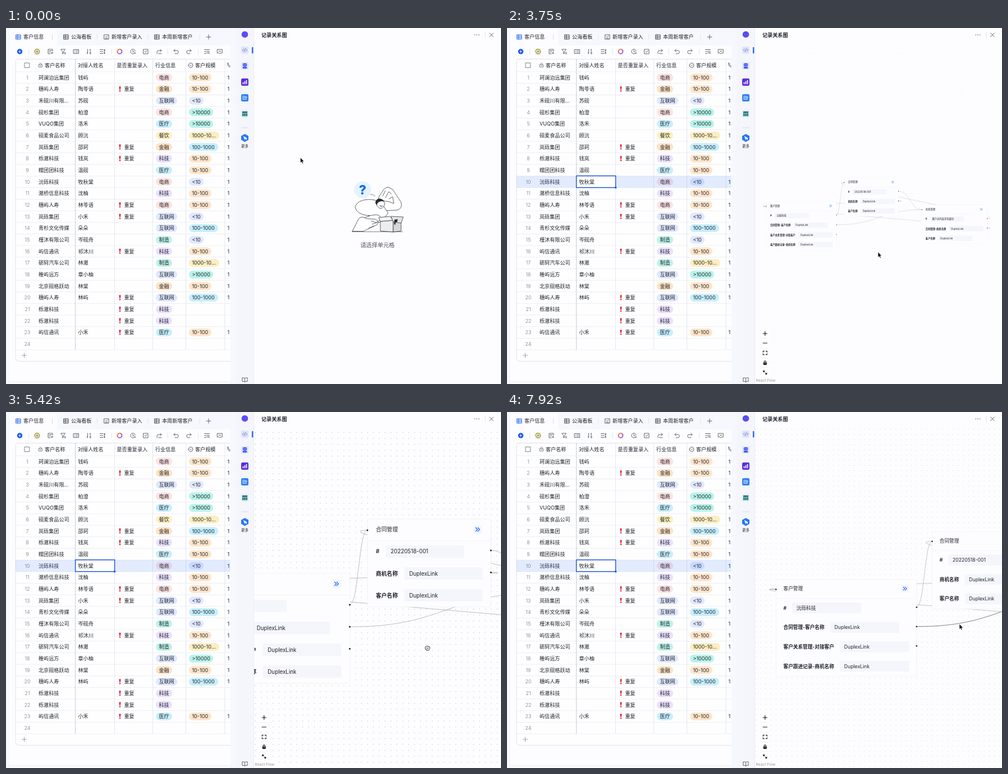
These frames come from a looping animation (882 px wide and 635 px high, 8 s). An HTML page:

```html
<!DOCTYPE html>
<html lang="zh-CN">
<head>
<meta charset="utf-8">
<style>
  html, body { margin: 0; width: 100%; height: 100%; overflow: hidden; background: #fdfdff; }
  svg { display: block; width: 882px; height: 635px; }
  text { font-family: Inter, "Noto Sans CJK SC", "Noto Sans CJK", "Noto Sans", sans-serif; white-space: pre; }
</style>
</head>
<body>
<svg id="stage" viewBox="0 0 882 635"></svg>
<script>
const LOOP = 8000, FPS = 12;
const INK = '#1f2329', BLUE = '#2468f2', GREY = '#50555e';

// ---- drawing helpers: each returns markup ----
const esc = s => s.replace(/</g, '&lt;').replace(/>/g, '&gt;');
const text = (x, y, s, size = 9.1, fill = INK, more = '') =>
  `<text x="${x}" y="${y + size * .37}" font-size="${size}" fill="${fill}" ${more}>${esc(s)}</text>`;
const rect = (x, y, w, h, fill, r = 0, more = '') =>
  `<rect x="${x}" y="${y}" width="${w}" height="${h}" rx="${r}" fill="${fill}" ${more}/>`;
const line = (d, stroke = GREY, w = .9, more = '') =>
  `<path d="${d}" fill="none" stroke="${stroke}" stroke-width="${w}" ${more}/>`;
const dot = (x, y, r, fill, more = '') => `<circle cx="${x}" cy="${y}" r="${r}" fill="${fill}" ${more}/>`;
const icon = (x, y, d, stroke, w, more) =>
  `<g transform="translate(${x} ${y})">${line(d, stroke, w, 'stroke-linecap="round" stroke-linejoin="round"')}${more || ''}</g>`;

// ---- table data ----
const rows = `珂澜泊远集团 钱屿 - 电商 10-100
穗屿人寿 陶苓语 ! 金融 10-100
禾砚川有限... 苏砚 - 互联网 <10
砚杉集团 柏澄 - 电商 >10000
VUQO集团 洛禾 - 医疗 >10000
砚麦食品公司 顾沅 - 餐饮 1000-10...
岚砾集团 邵珂 ! 金融 100-1000
栎澈科技 钱岚 ! 科技 10-100
糯团团科技 温砚 - 医疗 10-100
沅砾科技 牧秋棠 - 电商 <10
澈桥信息科技 沈柚 - 科技 10-100
穗屿人寿 林苓语 ! 电商 10-100
岚砾集团 小禾 ! 互联网 <10
青杉文化传媒 朵朵 - 互联网 100-1000
槿沐有限公司 岑砚舟 - 制造 <10
屿信通讯 祁沐川 ! 科技 10-100
砺轲汽车公司 林澈 - 制造 1000-10...
稚屿远方 章小柚 - 互联网 >10000
北京砚格跃动 林棠 - 金融 10-100
穗屿人寿 林屿 ! 互联网 100-1000
栎澈科技 - ! 科技 -
栎澈科技 - ! 科技 -
屿信通讯 小禾 ! 医疗 10-100`.split('\n').map(r => r.split(' '));

const industry = { 电商: '#fde2e2', 金融: '#fee2c6', 互联网: '#e0e8fe', 医疗: '#c8effc', 餐饮: '#fdf0bf', 科技: '#ebe1fc', 制造: '#c0f2e8' };
const scale = {
  '10-100': [40, '#fee5ca'], '<10': [26, '#e0e8fe'], '>10000': [43, '#b9f3ea'],
  '1000-10...': [54, '#fbeec2'], '100-1000': [52, '#c6effd']
};
const ROW = 20.67, rowY = i => 88.3 + i * ROW;

const gridIcon = (x, c) => icon(x, 16, 'M-4-4H4V4H-4ZM-4-1.3H4M-4 1.3H4M-1.2-4V4', c, 1);

function drawTabs() {
  const tab = (x, s) => text(x, 16, s);
  return rect(0, 0, 442, 635, '#f6f8fd') + rect(6, 31, 394, 604, '#fdfdff') +
    `<path d="M6 32V8Q6 3 11 3H86Q91 3 91 8V32Z" fill="#fdfdff"/>` +
    gridIcon(22, BLUE) + tab(31, '客户信息') + text(78, 16, '⋮', 9, '#8f959e') +
    gridIcon(107, GREY) + tab(116, '公海看板') +
    icon(179, 16, 'M-4-4H4V4H-4ZM-2-.8L-.6 .8 2-2M-2 2.6H2', GREY) + tab(188, '新增客户录入') +
    gridIcon(269, GREY) + tab(278, '本周新增客户') +
    icon(361, 16, 'M-4 0H4M0-4V4', GREY) +
    line('M162.5 11V21M253 11V21M345 11V21', '#dcdfe6', .8);
}

function drawTools() {
  const at = (x, d) => icon(x, 42, d, GREY);
  return dot(24.5, 42, 4.7, '#1456f0') + icon(24.5, 42, 'M-2 0H2M0-2V2', '#fff') +
    rect(49.5, 36, 12, 12, '#fdf6c9', 2) +
    at(55.5, 'M-2.2-4H2.2L4.5 0 2.2 4H-2.2L-4.5 0ZM-1.4 0A1.4 1.4 0 1 0 1.4 0 1.4 1.4 0 1 0-1.4 0') +
    at(79, 'M4-.5V-4H-4V4H0M-2-1.5H2M-2 1H0M1.5 2.5H4.5M3 1V4') +
    at(102, 'M-4-4H3.5L.5 0V3L-1.5 4V0ZM2 2H4.5M2 4H4.5') +
    at(125, 'M-4.5-3.5H4.5V3.5H-4.5ZM-2.5-1.2H-2M0-1.2H2.5M-2.5 1.2H-2M0 1.2H2.5') +
    at(148, 'M-2.5-4V4L-4.2 2M1-3.5L2.3-4V-.8M1 1H3.4L1 4H3.6') +
    at(172, 'M-4.5-3.5H1M-4.5 0H1M-4.5 3.5H1M3.5-3.5V3.5M2.3-2.2L3.5-3.6 4.7-2.2M2.3 2.2L3.5 3.6 4.7 2.2') +
    icon(202.5, 42, 'M-4 0A4 4 0 0 1 2.8-2.8', '#f0863c', 1.8) +
    icon(202.5, 42, 'M2.8-2.8A4 4 0 0 1 0 4', '#8a5cf5', 1.8) + icon(202.5, 42, 'M0 4A4 4 0 0 1-4 0', '#e457b8', 1.8) +
    at(226, 'M4 1.5A4.2 4.2 0 1 1 4.2-1M0-2.3V.3H2.3M2.5 3H4.8') +
    at(249, 'M-4-4H4V4H-4ZM-2-.2L-.4 1.5 2.3-1.6') +
    at(273, 'M-4 3.5V1Q-4-1.8-1-1.8H4M1.8-4L4.2-1.8 1.8 .4M-1.5 3.7H4') +
    at(303, 'M-1.8-4L-4-1.8-1.8 .4M-4-1.8H1.5Q4.2-1.8 4.2 1T1.5 3.8H-2') +
    at(326, 'M1.8-4L4-1.8 1.8 .4M4-1.8H-1.5Q-4.2-1.8-4.2 1T-1.5 3.8H2') +
    at(358, 'M-4.5-3.5H4.5M-4.5 0H-1.5M-4.5 3.5H-1.5M4 1A2 2 0 1 1 0 1 2 2 0 1 1 4 1M3.3 2.5L4.8 4') +
    at(381, 'M-4.3-3.8H4.3V2.6H1.3L0 4 -1.3 2.6H-4.3ZM-1.8-.6H1.8') +
    line('M40.5 37V47M188 37V47M288 37V47M342.5 37V47', '#dcdfe6', .8);
}

function drawTable() {
  const pill = (x, y, w, fill, s) => rect(x, y - 7, w, 14, fill, 7) + text(x + 5.4, y, s);
  let s = `<path d="M400 55.5H22Q17 55.5 17 60V588Q17 594.5 23.5 594.5H400" fill="#fefeff" stroke="#dcdfe8" stroke-width=".9"/>`;
  for (let i = 0; i < 25; i++) s += line(`M17 ${78 + i * ROW}H400`, '#e6e8f0', .7);
  s += line('M193.5 56V574M261.5 56V574M320.5 56V574M390 56V574', '#dfe1ea', .8) + line('M123.5 56V574', '#c3c7d2');
  s += icon(37.5, 66.5, 'M-4.2-4.2H4.2V4.2H-4.2Z', '#6d737d', .9) +
    icon(61.5, 66.5, 'M-3-.8H3V3.2H-3ZM-1.7-.8V-2.2A1.7 1.7 0 0 1 1.7-2.2V-.8M0 .6V1.6', '#646a73', .8) +
    text(69, 66.5, '客户名称') + text(128, 66.5, '对接人姓名') + text(197.5, 66.5, '是否重复录入') +
    text(266, 66.5, '行业信息') + text(337, 66.5, '客户规模') +
    icon(329, 66.5, 'M-4 0A4 4 0 1 0 4 0 4 4 0 1 0-4 0M-1.7-.7L0 1 1.7-.7') +
    icon(397.5, 66.5, 'M-3-3.5Q-3.5 2 3.5 3.7L3 1.5 1 .8Q-1.5-.2-1-1.8L-1.2-3.5Z') +
    icon(32.5, 584, 'M-4 0H4M0-4V4', '#8f959e');
  for (let i = 0; i < 24; i++) s += text(38, rowY(i), `${i + 1}`, 8.8, '#8f959e', 'text-anchor="middle"');
  rows.forEach(([name, person, dup, kind, size], i) => {
    const y = rowY(i);
    s += text(58, y, name) + pill(267, y, 10.8 + kind.length * 9.1, industry[kind], kind);
    if (person != '-') s += text(128.5, y, person);
    if (dup == '!') s += `<path d="M201.4 ${y - 4.3}Q203 ${y - 5.2} 204.6 ${y - 4.3}L203.6 ${y + 1.5}H202.4Z" fill="#dc1a2c"/>` +
      dot(203, y + 3.3, 1.2, '#dc1a2c') + text(210.5, y, '重复');
    if (scale[size]) s += pill(326, y, ...scale[size], size) + text(394.5, y, '1');
  });
  s += `<g id="over">${rect(17, 264, 383, 20.6, '#1f2329', 0, 'opacity=".04"')}</g>`;
  s += `<g id="picked">${rect(17, 264, 106, 20.6, '#3370ff', 0, 'opacity=".13"')}${rect(194, 264, 206, 20.6, '#3370ff', 0, 'opacity=".13"')}` +
    rect(123.6, 263.7, 70, 20.9, 'none', 0, 'stroke="#2456d8" stroke-width="1.5"') + rect(192.2, 283.2, 3, 3, '#2456d8') + '</g>';
  return `<g clip-path="url(#left)">${s}</g>` + line('M6 631H400', '#dfe2ea', .8);
}

function drawSidebar() {
  const x = 425.5;
  return rect(409, 0, 32.5, 635, '#f5f6fb') + line('M441.5 0V635', '#e6e8f0', .7) +
    dot(x, 11.5, 5.8, '#5b4df0') +
    rect(419, 33, 13, 13, '#dfe4fb', 2) + icon(x, 39.5, 'M-2-2L-4.2 0-2 2M2-2L4.2 0 2 2M.7-2.8L-.7 2.8', '#6a75b8', .9) +
    rect(438, 34, 2.4, 11.5, BLUE, 1) +
    rect(419, 61, 13, 13, '#dfe3fc', 2) + rect(421.8, 63, 7.4, 5.5, '#3d54e8', 2) + rect(421.8, 69.3, 7.4, 3, '#3d54e8', 1) +
    dot(424, 65.7, .8, '#fff') + dot(427, 65.7, .8, '#fff') +
    rect(419, 90, 13, 13, '#5a2ee0', 2.5) + icon(x, 96.5, 'M-3 3V1M0 3V-1M3 3V-3', '#fff', 1.7) +
    rect(419, 118, 13, 13, '#2f80f5', 2.5) + icon(x, 124.5, 'M-4-2.5H0M-4 0H-1M-4 2.5H3M3.4-.8A1.4 1.4 0 1 1 .6-.8 1.4 1.4 0 1 1 3.4-.8', '#fff', 1) +
    rect(419, 146.5, 13, 13, '#e0e6f6', 2) + rect(421, 149, 9, 2.4, '#1d5a78') +
    [421, 424.2, 427.4].map(c => rect(c, 152.2, 2.6, 5, '#17876f')).join('') +
    line('M419.5 178H432', '#d3d6df') +
    `<path d="M425.5 189L432 192.6V199.6L425.5 203.2 419 199.6V192.6Z" fill="#2a76f6"/><path d="M423 192.7L429 196.2V199.5L425.5 197.5V201Z" fill="#fff"/>` +
    text(x, 210.7, '更多', 6.5, INK, 'text-anchor="middle"') +
    icon(x, 627.5, 'M0-2.8Q-1-3.6-2.2-3.6H-4.6V3H-1.8L0 4 1.8 3H4.6V-3.6H2.2Q1-3.6 0-2.8V4', GREY);
}

function drawEmpty() {
  const ln = (d, fill = '#fff') => `<path d="${d}" fill="${fill}" stroke="#2b2f36" stroke-width=".75" stroke-linejoin="round"/>`;
  return dot(635.5, 288.5, 15.3, '#e6f3ff') +
    text(635.5, 288.8, '?', 23, '#0f6bf5', 'text-anchor="middle" font-weight="800"') +
    line('M649 297Q654 296 658 300', '#555', .7) +
    ln('M665 300L671 291Q675 284 681 284L689 288 704 311Q707 323 696 325L668 326 660 317Z') +
    ln('M671 300L676 290M676 303L682 292 687 296M682 305L689 301', 'none') +
    ln('M689 301L691 313Q680 308 672 309', 'none') +
    ln('M622 319Q626 307 644 306 658 305 669 312L681 330 668 346 642 351 632 341 648 335Q624 333 622 319Z') +
    ln('M659 311Q661 304 668 306L675 312Q674 321 667 322 660 319 659 311Z') +
    `<path d="M658 312Q660 302 669 305L675 309Q667 308 662 312L661 316Z" fill="#24272c"/>` +
    line('M666 317Q669 319 671 317', '#24272c', 1) +
    ln('M617 362.5L628 341Q633 334 642 340L658 341Q666 345 661 351L648 357 637 362.5Z') +
    ln('M645 335L660 333Q668 334 668 341L660 347 650 344', 'none') + ln('M652 350L661 347M646 357L656 353', 'none') +
    ln('M667 345L690 343V364L667 362Z', '#eceded') + ln('M690 343L704 346V362L690 364Z', '#d5d7da') +
    ln('M667 345L664 338 684 336 690 343Z', '#f4f4f5') + ln('M690 346L686 336 708 337 704 348Z', '#e2e3e5') +
    `<path d="M692 342L698 341 697 346 694 347V351L691.5 350Z" fill="#24272c"/>` + line('M616 363.5H707', '#2b2f36', .6) +
    text(662, 387, '请选择单元格', 10.2, GREY, 'text-anchor="middle"');
}

// ---- graph, in screen units at full zoom ----
const nodes = [
  { x: 435.5, y: 288, w: 284, title: '客户管理', ports: 3, fields: [['#', '沅砾科技'], ['合同管理-客户名称'], ['客户关系管理-对接客户'], ['客户跟进记录-商机名称']] },
  { x: 751, y: 191, w: 220, title: '合同管理', ports: 2, fields: [['#', '20220518-001'], ['商机名称'], ['客户名称']] },
  { x: 1066, y: 302, w: 265, title: '商机管理', ports: 2, fields: [['#', '客户对内容存有疑问'], ['合同管理-商机名称'], ['客户名称']] }
];
const STEP = 39.2, FONT = 9.8;
const inPort = n => [n.x, n.y + 20];
const outPort = (n, i) => [n.x + n.w, n.y + 56 + i * STEP];

function edge([x1, y1], [x2, y2], id = '') {
  const d = x2 - x1, o = d >= 0 ? d / 2 : 6.25 * Math.sqrt(-d * .7);
  return line(`M${x1} ${y1}C${x1 + o} ${y1} ${x2 - o} ${y2} ${x2} ${y2}`, '#b3b2b0', .85, id);
}

function drawNode(n) {
  const tx = n.x + 15, top = n.y + 18.5, h = 39 + n.fields.length * STEP;
  let s = rect(n.x, n.y, n.w, h, '#fdfdff', 2, 'stroke="#eff0f4" stroke-width=".8"') +
    line(`M${n.x} ${n.y + 38.5}h${n.w}`, '#f0f1f5', .8) + text(tx, top, n.title, FONT, INK, 'font-weight="500"') +
    rect(n.x + n.w - 31, top - 7.5, 15, 15, '#f1f6ff', 2) +
    icon(n.x + n.w - 23.5, top, 'M-3.5-3.3L-.3 0-3.5 3.3M.3-3.3L3.5 0 .3 3.3', BLUE, 1.3);
  n.fields.forEach(([label, value = 'DuplexLink'], i) => {
    const y = top + (i + 1) * STEP;
    const cjk = label.replace(/[-#]/g, '').length;
    const bx = tx + 11.6 + (cjk ? cjk * FONT + (label.includes('-') ? 4.5 : 0) : 6);
    const id = n === nodes[1] && i === 2 ? 'id="field"' : '';
    s += text(tx, y, label, FONT, INK, 'font-weight="600"') + rect(bx, y - 11, 139.5, 22, '#f5f6fc', 1.5, id) + text(bx + 8.7, y, value, FONT);
  });
  s += dot(...inPort(n), 1.4, '#111');
  for (let i = 0; i < n.ports; i++) s += dot(...outPort(n, i), 1.4, '#111');
  return s;
}

function drawFlow() {
  const [a, b, c] = nodes;
  const btn = (y, d, more) => icon(459.8, y, d, '#111', 1.1, more);
  return `<g id="flow" clip-path="url(#right)">` + rect(442, 30, 440, 603, 'url(#dots)') + '<g id="world">' +
    edge(outPort(a, 0), inPort(b)) + edge(outPort(b, 0), inPort(c)) + edge(outPort(a, 1), inPort(c), 'id="hot"') +
    edge(outPort(c, 0), inPort(b)) + edge(outPort(b, 1), inPort(a)) + edge(outPort(c, 1), inPort(a)) +
    nodes.map(drawNode).join('') + '</g>' +
    rect(451, 536, 17.5, 87.5, '#fefeff') + line('M451 553.5h17.5M451 571h17.5M451 588.5h17.5M451 606h17.5', '#eeeef2', .8) +
    btn(545, 'M-3.6 0H3.6M0-3.6V3.6') + btn(562, 'M-3.6 0H3.6') +
    btn(579.5, 'M-3.5-1.3V-3.3H-1.3M1.3-3.3H3.5V-1.3M3.5 1.3V3.3H1.3M-1.3 3.3H-3.5V1.3') +
    btn(597.5, 'M-1.6-.5V-2A1.6 1.6 0 0 1 1.6-2V-.5', rect(-2.9, -.8, 5.8, 4.2, '#111', .6) + dot(0, 1.3, .7, '#fff')) +
    btn(614.5, 'M-3-.8V-3H-.8M-3-3L-.8-.8M3 .8V3H.8M3 3L.8 .8') +
    rect(442, 624, 37, 9, '#fdfdff') + text(443.5, 628.8, 'React Flow', 6.7, '#999') + '</g>';
}

const stage = document.getElementById('stage');
stage.innerHTML = `<defs>
  <clipPath id="left"><rect y="50" width="399.7" height="550"/></clipPath>
  <clipPath id="right"><rect x="442" y="30" width="440" height="603"/></clipPath>
  <pattern id="dots" x="435.5" y="288" width="10.5" height="10.5" patternUnits="userSpaceOnUse">${dot(.6, .6, .5, '#9a9ca8')}</pattern>
  <linearGradient id="fade" gradientUnits="userSpaceOnUse" x1="0" y1="-8" x2="0" y2="9">
    <stop offset=".4" stop-color="#2f6df6"/><stop offset="1" stop-color="#2f6df6" stop-opacity=".15"/></linearGradient>
  </defs>` +
  drawTabs() + drawTools() + drawTable() + drawSidebar() + rect(442, 0, 440, 635, '#fdfdff') +
  text(455, 12.3, '记录关系图', 9.1, INK, 'font-weight="700"') +
  [835.3, 839, 842.7].map(x => dot(x, 12.3, .8, GREY)).join('') + line('M854 7V18', '#dcdfe6', .8) +
  icon(865, 12.3, 'M-3.4-3.4L3.4 3.4M3.4-3.4L-3.4 3.4', GREY) +
  `<g id="empty">${drawEmpty()}</g>` + drawFlow() +
  `<g id="spin">${line('M1.5-8.4A8.5 8.5 0 0 0-3.6 7.7', 'url(#fade)', 1.8, 'stroke-linecap="round"')}</g>` +
  `<path id="arrow" d="M0 0V9.6L2.2 7.7 3.7 11 5.3 10.3 3.9 7.1H6.7Z" fill="#000" stroke="#fff" stroke-width=".7"/>` +
  `<g id="hand"><path d="M-4-1Q-4-3.4-2-3.2 0-4.4 1.6-3.2 4-3.4 4.2-.8 4.2 3.6 .8 3.9H-1Q-4.2 3-4-1Z" fill="#fff" stroke="#111" stroke-width=".9"/>${line('M-2-.6H2.4M-2 1.3H2', '#333', .7)}</g>`;

// ---- motion: rows are [step, ...values] ----
const cursor = [[1, 524.5, 231], [2, 522, 242], [6, 522, 242], [13, 160, 272], [17, 160, 272], [26, 629, 479.5],
  [30, 629, 479.5], [35, 661, 399.5], [45, 661, 399.5], [47, 651, 323.5], [58, 651, 323.5], [62, 645, 424],
  [68, 857, 418.5], [75, 804, 379], [79, 804, 379], [81, 807.5, 379], [88, 807.5, 379], [89, 806, 378]];
const panX = [[62, -214], [68, 0]], panY = [[62, 3], [65, 0]];
const zoomIn = [[50, 0], [54, 1]];
const zoomOut = [[85, 1], [86, .98], [90, .98], [95, .882]];

function track(keys, k) {
  const i = keys.findIndex(q => q[0] >= k);
  if (i < 0) return keys[keys.length - 1].slice(1);
  if (!i) return keys[0].slice(1);
  const a = keys[i - 1], b = keys[i], p = (k - a[0]) / (b[0] - a[0]), e = p * p * (3 - 2 * p);
  return a.slice(1).map((v, j) => v + (b[j + 1] - v) * e);
}

function view(k) {
  const early = k < 80;
  const s = early ? Math.pow(.4392, 1 - track(zoomIn, k)[0]) : track(zoomOut, k)[0];
  const [ax, ay] = early ? [651, 323.5] : [807, 379];
  return `translate(${ax * (1 - s) + s * track(panX, k)[0]} ${ay * (1 - s) + s * track(panY, k)[0]}) scale(${s})`;
}

const el = Object.fromEntries([...stage.querySelectorAll('[id]')].map(e => [e.id, e]));
const show = (e, on) => e.setAttribute('visibility', on ? 'visible' : 'hidden');

function draw(ms) {
  const k = Math.floor(ms * FPS / 1000 + .05);
  const at = `translate(${track(cursor, k).join(' ')})`, drag = k >= 62 && k < 69, hot = k >= 75;
  show(el.over, k >= 12 && k < 17);
  show(el.picked, k >= 17);
  show(el.empty, k < 19);
  show(el.spin, k >= 19 && k < 34);
  show(el.flow, k >= 34);
  show(el.arrow, !drag);
  show(el.hand, drag);
  el.arrow.setAttribute('transform', at);
  el.hand.setAttribute('transform', at);
  el.spin.setAttribute('transform', `translate(661.5 330) rotate(${(k - 30) * 30})`);
  el.world.setAttribute('transform', view(k));
  el.dots.setAttribute('patternTransform', view(k));
  el.field.setAttribute('fill', k >= 47 && k < 60 ? '#eaeaed' : '#f5f6fc');
  el.hot.setAttribute('stroke', hot ? '#55555a' : '#b3b2b0');
}

function tick(now) {
  draw(now % LOOP);
  requestAnimationFrame(tick);
}
draw(0);
requestAnimationFrame(tick);
</script>
</body>
</html>
```
